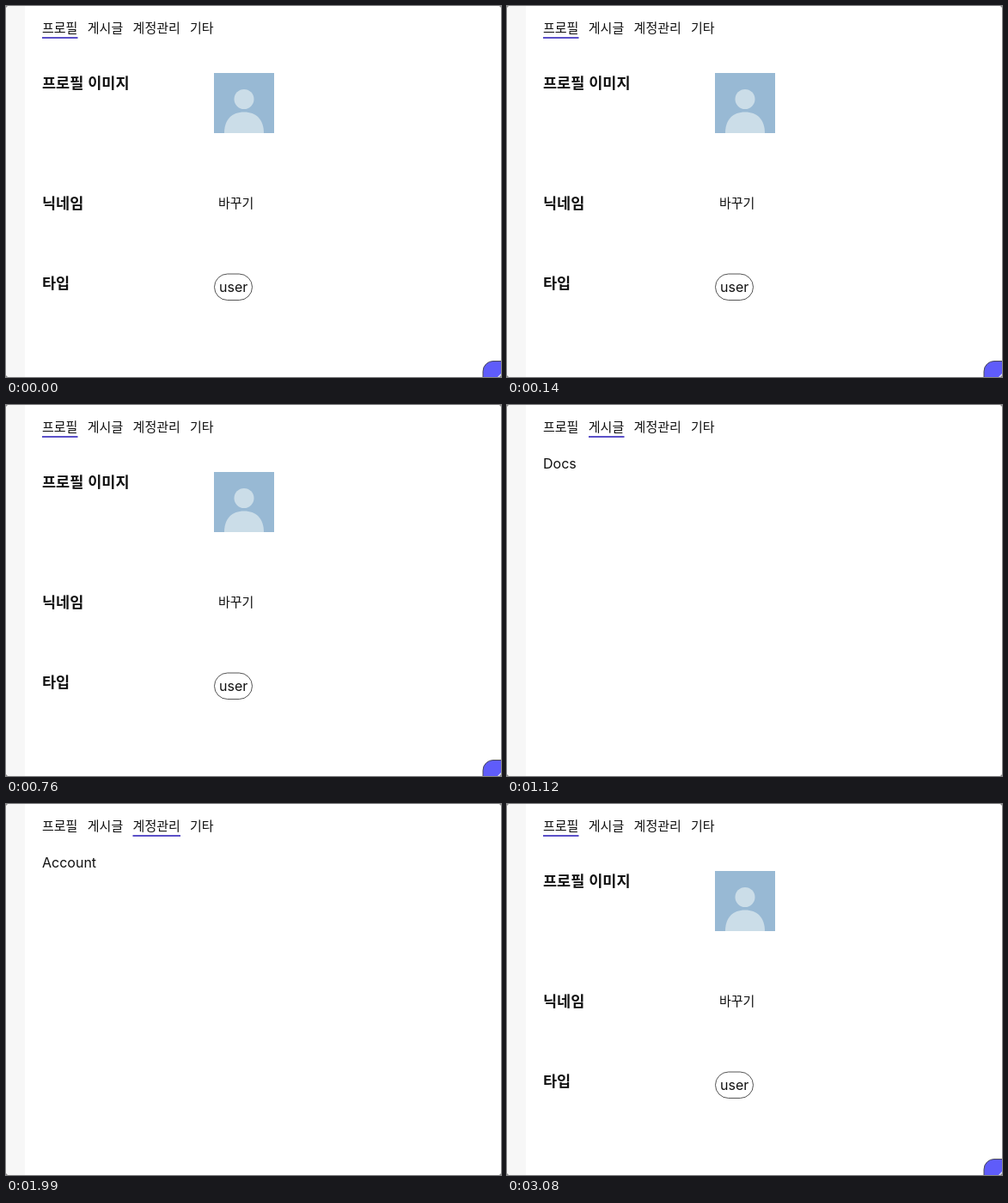
An HTML page for the animation above (3.64 s loop, 576x432 px).

```html
<!DOCTYPE html>
<html lang="ko">
<head>
<meta charset="utf-8">
<title>프로필</title>
<style>
  html, body { margin: 0; width: 100%; height: 100%; overflow: hidden; background: #fff; }
  svg { display: block; width: 576px; height: 432px; }
  text { font: 15px "Noto Sans CJK KR", "Noto Sans CJK", sans-serif; fill: #111; }
  .label { font-size: 17.5px; font-weight: 700; }
  .latin { font: 16px Inter, sans-serif; }
</style>
</head>
<body>
<svg viewBox="0 0 576 432">
  <rect width="576" height="432" fill="#fff"/>
  <rect width="22" height="432" fill="#f7f7f7"/>

  <g>
    <text x="42" y="30.5">프로필</text>
    <text x="94.8" y="30.5">게시글</text>
    <text x="147.6" y="30.5">계정관리</text>
    <text x="214" y="30.5">기타</text>
    <rect id="line" y="36" height="2" fill="#5b50c8"/>
  </g>

  <g id="profile">
    <text class="label" x="42" y="95.5">프로필 이미지</text>
    <text class="label" x="42" y="235.5">닉네임</text>
    <text class="label" x="42" y="329.3">타입</text>

    <rect x="242" y="78" width="70" height="70" fill="#98b9d4"/>
    <g fill="#cbdde8">
      <circle cx="277" cy="108.5" r="11.5"/>
      <path d="M254 148C254 132 263 123.500 277 123.500S300 132 300 148Z"/>
    </g>

    <text x="247" y="234.500">바꾸기</text>
    <rect x="242.500" y="312" width="44" height="30.500" rx="15.250" fill="#fff" stroke="#555"/>
    <text class="latin" x="248" y="333">user</text>

    <rect x="555" y="413.500" width="40" height="40" rx="12" fill="#5f5cfa" stroke="#4a4a58"/>
    <path d="M572 432L576 428V432Z" fill="#e4e3ff"/>
  </g>

  <text id="docs" class="latin" x="42" y="73.500">Docs</text>
  <text id="account" class="latin" x="42" y="73.500">Account</text>

  <path d="M0 0H2L0 2ZM576 0V2L574 0ZM0 432V430L2 432ZM576 432H574L576 430Z" fill="#8a8a8a"/>
</svg>
<script>
  const LOOP = 3640;
  const tabs = {
    profile: { x: 42, width: 41.5 },
    docs: { x: 95, width: 41.5 },
    account: { x: 147.5, width: 55.5 }
  };
  const steps = [[0, "profile"], [1120, "docs"], [1610, "account"], [2240, "profile"]];
  const line = document.getElementById("line");
  const start = performance.now();
  let current;

  function show(name) {
    if (name === current) return;
    current = name;
    for (const id in tabs) {
      document.getElementById(id).style.display = id === name ? "" : "none";
    }
    line.setAttribute("x", tabs[name].x);
    line.setAttribute("width", tabs[name].width);
  }

  function tick() {
    const t = (performance.now() - start) % LOOP;
    show(steps.filter(([at]) => at <= t).pop()[1]);
    requestAnimationFrame(tick);
  }
  tick();
</script>
</body>
</html>
```
